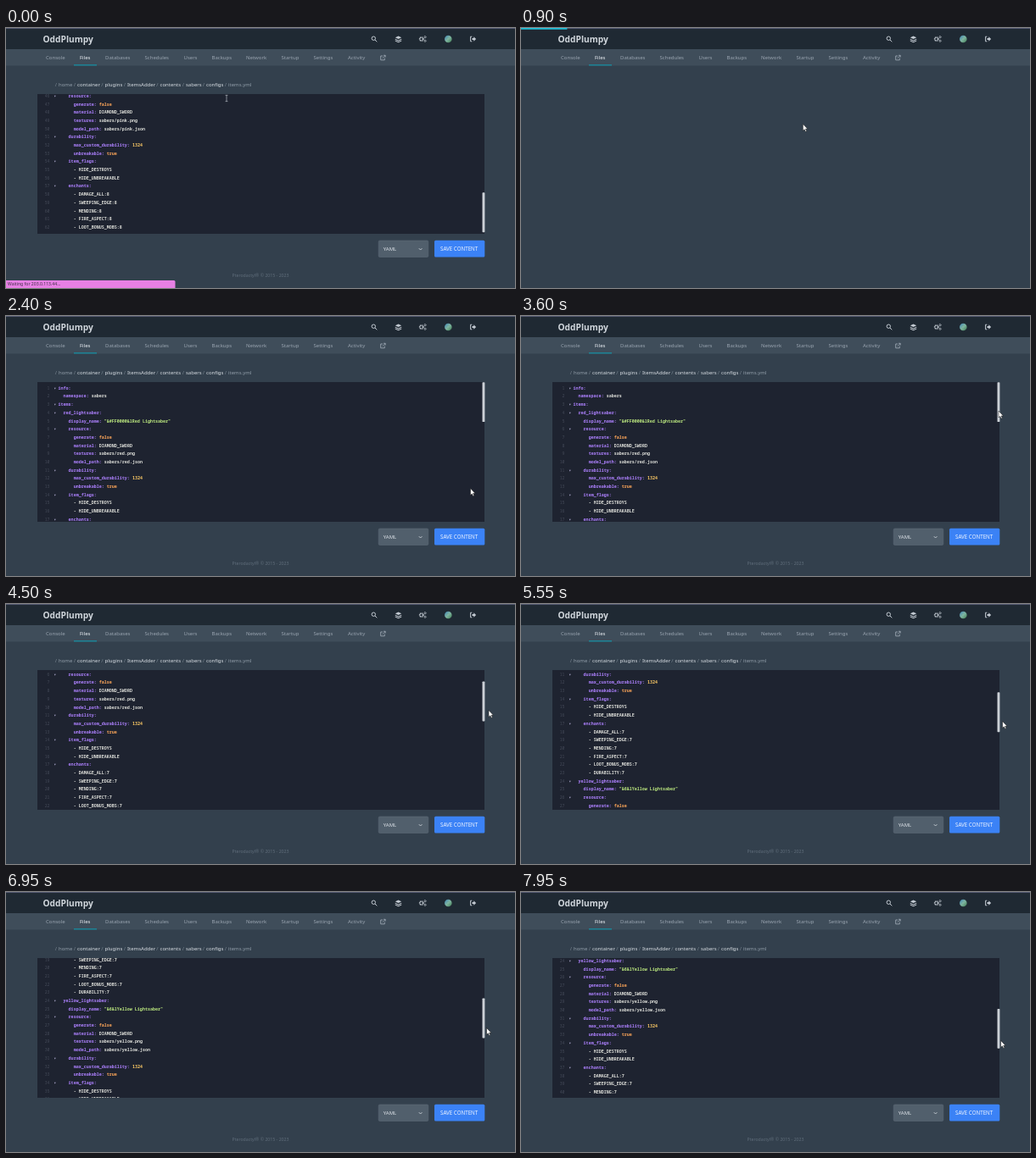
Write an HTML page that moves like this. It is 600 by 307 pixels and loops after 8000 ms.

```html
<!DOCTYPE html>
<html lang="en">
<head>
<meta charset="utf-8">
<title>File editor</title>
<style>
  html, body { margin: 0; height: 100%; overflow: hidden; background: #33404d; }
  svg { display: block; width: 100vw; height: 100vh; }
  text { font-family: "Noto Sans", sans-serif; font-size: 6px; white-space: pre; }
  #code text { font-family: "Noto Sans Mono", monospace; font-size: 5.02px; font-weight: 600; fill: #dcddd8; }
  #code .num { fill: #444a58; text-anchor: end; font-size: 4.8px; font-weight: 400; }
  #code .fold { fill: #a9a4c8; font-family: "DejaVu Sans Mono", monospace; font-weight: 400; }
  .key { fill: #ae81ff; }
  .word { fill: #ffa759; }
  .value { fill: #ffcc66; }
  .string { fill: #bae67e; }
  .icon { fill: none; stroke: #c3cad2; stroke-width: 1; }
  .solid { fill: #c3cad2; }
</style>
</head>
<body>
<svg viewBox="0 0 600 307" preserveAspectRatio="none">
  <defs>
    <clipPath id="pane"><rect x="37" y="78" width="527" height="165"/></clipPath>
    <linearGradient id="avatar" x2="1" y2="1">
      <stop stop-color="#3d83b8"/><stop offset=".5" stop-color="#7fb5a0"/><stop offset="1" stop-color="#3f7d52"/>
    </linearGradient>
  </defs>
  <rect width="600" height="307" fill="#33404d"/>

  <g id="nav">
    <rect width="600" height="25" fill="#1f2933"/>
    <rect y="25" width="600" height="19.5" fill="#3f4d5a"/>
    <text x="43.5" y="16.8" style="font-size:10.2px;font-weight:600" fill="#d0d6dc">OddPlumpy</text>
    <g class="icon">
      <circle cx="433.3" cy="12.2" r="2.2"/><path d="M435 14l2.3 2.3"/>
      <g stroke-dasharray="1.2 .5">
        <circle cx="489.7" cy="13" r="2" stroke-width="1.7"/>
        <circle cx="494" cy="10.7" r="1.1"/><circle cx="494" cy="15.2" r="1.1"/>
      </g>
      <path d="M549.3 10.2h-1.7v5.6h1.7"/>
      <path d="M444 33h-2.3v4.8h4.6v-2.2M444 35.6l3-3M445 32.3h2.2v2.2" stroke="#9aa5b1" stroke-width=".9"/>
    </g>
    <path class="solid" d="M458.8 11.2l3.7-1.7 3.7 1.7-3.7 1.7zM458.8 12.8l3.7 1.6 3.7-1.6v.9l-3.7 1.7-3.7-1.7zM458.8 14.6l3.7 1.6 3.7-1.6v.9l-3.7 1.7-3.7-1.7zM549.5 12h1.8v-1.8l2.8 2.8-2.8 2.8V14h-1.8z"/>
    <circle cx="521.3" cy="13" r="4.3" fill="url(#avatar)"/>
    <g id="tabs"></g>
    <rect x="80" y="43.2" width="27" height="1.2" fill="#1592a6"/>
  </g>

  <g id="content">
    <g id="crumbs"></g>
    <rect x="37" y="78" width="527" height="165" fill="#1e2330"/>
    <g clip-path="url(#pane)"><g id="code"></g></g>
    <rect id="thumb" x="561.5" width="2.9" height="46.8" rx=".7" fill="#cbd0d6"/>
    <g id="loading">
      <rect x="37" y="78" width="527" height="165" fill="#000" opacity=".45"/>
      <circle cx="300.5" cy="161" r="6" fill="none" stroke="#fff" stroke-opacity=".2" stroke-width="1.4"/>
      <path id="arc" d="M304.7 156.8a6 6 0 0 1 0 8.4" fill="none" stroke="#fff" stroke-width="1.4"/>
    </g>
    <rect x="439.2" y="251" width="58.6" height="19.5" rx="1.5" fill="#515f6c" stroke="#606d7b" stroke-width=".5"/>
    <text x="444.8" y="263" fill="#dde2e8">YAML</text>
    <path d="M486.8 260.2l1.8 1.8 1.8-1.8" class="icon" stroke-width=".7"/>
    <rect x="505" y="250.8" width="59.3" height="19.8" rx="1.5" fill="#3b82f6"/>
    <text x="512" y="263" style="font-size:6.2px" fill="#eef4ff">SAVE CONTENT</text>
    <text x="300" y="294.3" text-anchor="middle" style="font-size:5.2px" fill="#606d7b">Pterodactyl® © 2015 - 2023</text>
  </g>

  <rect width="600" height=".8" fill="#5f6480"/>
  <rect id="progress" width="600" height="1.7" fill="#22c3dc"/>
  <g id="status">
    <path d="M0 298h198q1.5 0 1.5 1.5V307H0z" fill="#e780e4"/>
    <text x="2" y="304.4" style="font-size:5.1px" fill="#43304a">Waiting for 203.0.113.44...</text>
  </g>
  <path id="beam" d="M-1.4-3.6h2.8M0-3.6v7.2M-1.4 3.6h2.8" fill="none" stroke="#b4b9c0" stroke-width=".7"/>
  <path id="arrow" d="M0 0v8l1.8-1.6 1.3 2.7 1.3-.6-1.3-2.6h2.4z" fill="#fff" stroke="#111" stroke-width=".5"/>
</svg>
<script>
const $ = id => document.getElementById(id);
const LOOP = 8000, PITCH = 9.69, CHAR = 3.03, END = 441;

function addText(parent, x, y, content, attrs = {}) {
  const el = document.createElementNS('http://www.w3.org/2000/svg', 'text');
  for (const [name, value] of Object.entries({ x, y, ...attrs })) el.setAttribute(name, value);
  el.innerHTML = content;
  parent.append(el);
  return el;
}

const tabs = { Console: 47, Files: 87, Databases: 117, Schedules: 163.5, Users: 209.5, Backups: 242.5,
  Network: 283, Startup: 324.5, Settings: 362.5, Activity: 403 };
for (const [name, x] of Object.entries(tabs))
  addText($('tabs'), x, 37.2, name, { fill: name === 'Files' ? '#f0f4f8' : '#9aa5b1' });

const crumbs = { home: 62, container: 84, plugins: 116.5, ItemsAdder: 143, contents: 181.5,
  sabers: 212, configs: 236, 'items.yml': 262 };
for (const [name, x] of Object.entries(crumbs)) {
  const muted = name === 'home' || name === 'items.yml';
  addText($('crumbs'), x - 4.2, 69, '/', { fill: '#7b8794' });
  addText($('crumbs'), x, 69, name, { fill: muted ? '#929eaa' : '#d9dee4' });
}

const saber = (color, prefix, level) => {
  const title = color[0].toUpperCase() + color.slice(1);
  const enchants = ['DAMAGE_ALL', 'SWEEPING_EDGE', 'MENDING', 'FIRE_ASPECT', 'LOOT_BONUS_MOBS', 'DURABILITY'];
  return [
    `  ${color}_lightsaber:`,
    `    display_name: "${prefix}&l${title} Lightsaber"`,
    '    resource:', '      generate: false', '      material: DIAMOND_SWORD',
    `      textures: sabers/${color}.png`, `      model_path: sabers/${color}.json`,
    '    durability:', '      max_custom_durability: 1324', '      unbreakable: true',
    '    item_flags:', '      - HIDE_DESTROYS', '      - HIDE_UNBREAKABLE',
    '    enchants:', ...enchants.map(name => `      - ${name}:${level}`)
  ];
};
const lines = ['info:', '  namespace: sabers', 'items:',
  ...saber('red', '&#FF0000', 7), ...saber('yellow', '&6', 7), ...saber('pink', '&d', 8)].slice(0, 62);

const escape = s => s.replace(/&/g, '&amp;');
const span = (type, s) => `<tspan class="${type}">${escape(s)}</tspan>`;

function highlight(line) {
  const match = line.match(/^(\w+:)(.*)$/);
  if (!match) return escape(line);
  const value = match[2];
  const type = value.includes('"') ? 'string' : /true|false/.test(value) ? 'word' : /^ \d+$/.test(value) ? 'value' : '';
  return span('key', match[1]) + span(type, value);
}

const folds = [];
lines.forEach((line, i) => {
  const y = 86.8 + i * PITCH, body = line.trimStart();
  addText($('code'), 51.5, y, i + 1, { class: 'num' });
  if (body.endsWith(':')) folds.push(addText($('code'), 56.2, y, '▾', { class: 'fold' }));
  addText($('code'), 61.5 + (line.length - body.length) * CHAR, y, highlight(body));
});

// Linear interpolation through [time, value] stops.
function track(stops, t) {
  const next = stops.findIndex(stop => stop[0] > t);
  if (next < 0) return stops[stops.length - 1][1];
  if (next === 0) return stops[0][1];
  const [t0, a] = stops[next - 1], [t1, b] = stops[next];
  return a + (b - a) * (t - t0) / (t1 - t0);
}

const scrollStops = [[3620, 0], [4500, 50.4], [5550, 98.9], [6950, 179.6], [7950, 226.7]];
const xStops = [[750, 260], [1350, 547.5], [2600, 547.5], [3200, 563], [3620, 563],
  [4500, 569], [5550, 567.6], [6950, 566.5], [7950, 565.6]];
const yStops = [[750, 83], [1350, 203.6], [2600, 203.6], [3200, 107], [3500, 112], [3620, 112],
  [4500, 125.4], [5550, 138.4], [6950, 160.4], [7950, 175.4]];
const progressStops = [[850, 0], [1300, 480], [1450, 566], [1550, 600]];

const show = (el, visible) => el.style.display = visible ? '' : 'none';
const move = (el, x, y) => el.setAttribute('transform', `translate(${x} ${y})`);

function draw(t) {
  const before = t < 450;
  const scroll = before ? END : track(scrollStops, t);
  show($('nav'), before || t >= 850);
  show($('content'), before || t >= 1200);
  show($('status'), t < 850);
  show($('loading'), t >= 1200 && t < 1650);
  folds.forEach(fold => show(fold, before || t >= 1650));

  move($('code'), 0, -scroll);
  $('thumb').setAttribute('y', 78.3 + scroll / 3.8);
  $('arc').setAttribute('transform', `rotate(${(t - 1450) * 0.36} 300.5 161)`);

  show($('progress'), t >= 850 && t < 1720);
  $('progress').setAttribute('width', track(progressStops, t));
  $('progress').setAttribute('opacity', track([[1550, 1], [1720, 0]], t));

  const x = track(xStops, t), y = track(yStops, t);
  show($('beam'), before);
  show($('arrow'), !before);
  move($('beam'), x, y);
  move($('arrow'), x, y);
}

const start = performance.now();
function frame() {
  draw((performance.now() - start) % LOOP);
  requestAnimationFrame(frame);
}
frame();
</script>
</body>
</html>
```
